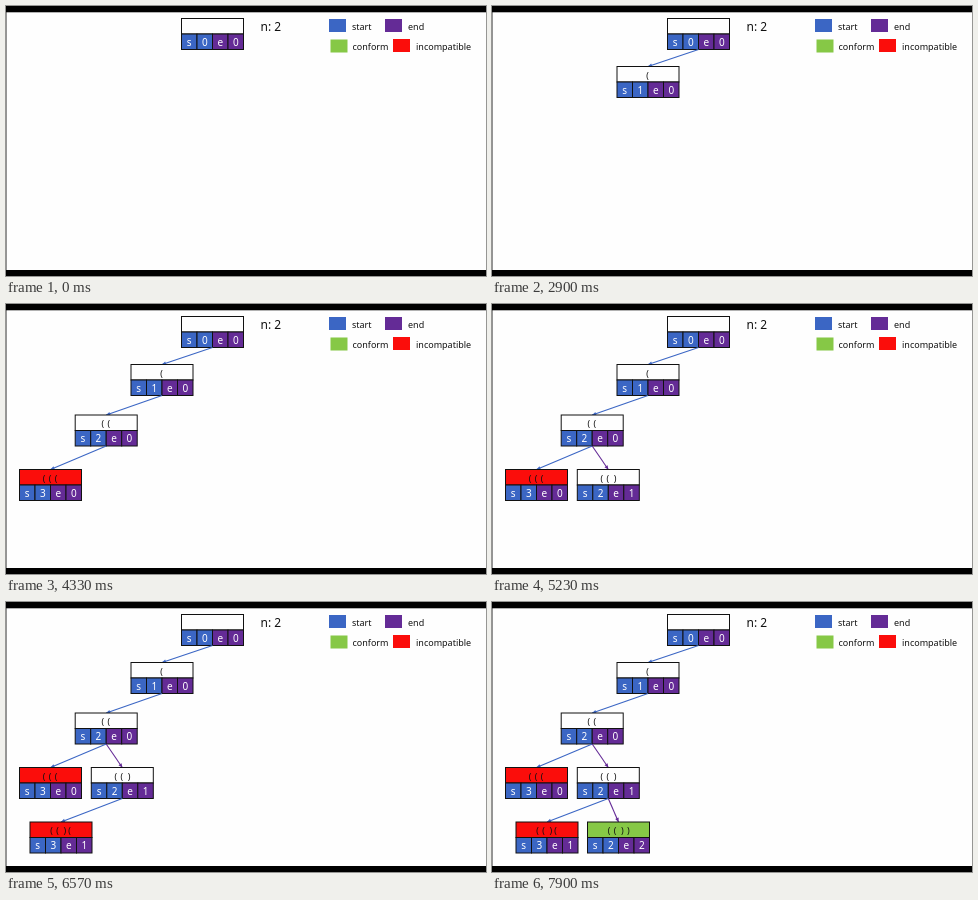
Animation of 480x270 px, one loop 8 s. Source, as an HTML page:

```html
<!DOCTYPE html>
<html lang="en">
<head>
<meta charset="utf-8">
<title>Parentheses tree</title>
<style>
  html, body { margin: 0; width: 100%; height: 100%; overflow: hidden; background: #fefefe; }
  svg { display: block; width: 100%; height: 100%; }
  text { font-family: "Noto Sans", "Open Sans", sans-serif; font-size: 9px; fill: #111; }
  .n { font-size: 12px; }
  .cell { font-size: 10px; fill: #fff; text-anchor: middle; }
  .paren { font-family: "Noto Sans Mono", monospace; text-anchor: middle; }
  .box { stroke: #111; stroke-width: 1; }
</style>
</head>
<body>
<svg id="stage" viewBox="0 0 480 270"></svg>
<script>
const LOOP = 8000;
const BLUE = '#3b66c4', PURPLE = '#642b96', GREEN = '#86c846', RED = '#fb0d0b', WHITE = '#fefefe';
const stage = document.getElementById('stage');

function add(parent, tag, attrs = {}, text = '') {
  const el = document.createElementNS('http://www.w3.org/2000/svg', tag);
  for (const key in attrs) el.setAttribute(key, attrs[key]);
  el.textContent = text;
  return parent.appendChild(el);
}

function rect(parent, x, y, width, height, fill, cls = '') {
  return add(parent, 'rect', { x, y, width, height, fill, class: cls });
}

function legend(x, y, color, label, textX, baseline) {
  rect(stage, x, y, 17, 13, color);
  add(stage, 'text', { x: textX, y: baseline }, label);
}

function arrow(parent, x1, y1, x2, y2, color) {
  add(parent, 'line', { x1, y1, x2, y2, stroke: color, 'stroke-width': 1.1 });
  const angle = Math.atan2(y2 - y1, x2 - x1) * 180 / Math.PI;
  add(parent, 'path', {
    d: 'M0 0L-4 -1.9V1.9Z', fill: color,
    transform: `translate(${x2} ${y2}) rotate(${angle})`
  });
}

function drawNode({ x, y, word, at = 0, from, fill = WHITE }) {
  const g = add(stage, 'g');
  const mid = x + 31;
  if (from) {
    const color = word.endsWith('(') ? BLUE : PURPLE;
    arrow(g, from.x + 31, from.y + 31, mid, y, color);
  }
  rect(g, x, y, 62, 15.5, fill, 'box');
  [...word].forEach((ch, i) => add(g, 'text', {
    x: mid + (i - (word.length - 1) / 2) * 6 + (ch === ')' ? 1 : -0.5),
    y: y + 12, class: 'paren'
  }, ch));

  const opened = word.split('(').length - 1;
  ['s', opened, 'e', word.length - opened].forEach((label, i) => {
    const left = x + i * 15.5;
    rect(g, left, y + 15.5, 15.5, 15.5, i < 2 ? BLUE : PURPLE, 'box');
    add(g, 'text', { x: left + 7.75, y: y + 27, class: 'cell' }, label);
  });

  if (at) {
    const offset = at / LOOP;
    g.animate([
      { opacity: 0, offset: 0 }, { opacity: 0, offset },
      { opacity: 1, offset }, { opacity: 1, offset: 1 }
    ], { duration: LOOP, iterations: Infinity });
  }
}

rect(stage, 0, 0, 480, 270, WHITE);
rect(stage, 0, 6, 0.7, 258, '#666');
rect(stage, 0, 0, 480, 6.3, '#000');
rect(stage, 0, 264, 480, 6, '#000');

add(stage, 'text', { x: 254.5, y: 25, class: 'n' }, 'n: 2');
legend(323, 13, BLUE, 'start', 346, 24);
legend(379, 13, PURPLE, 'end', 402, 24);
legend(324.5, 33.5, GREEN, 'conform', 346.5, 44);
legend(387, 33, RED, 'incompatible', 410, 44);

const root = { x: 175.5, y: 12.5, word: '' };
const one = { x: 125, y: 60.5, word: '(', at: 2000, from: root };
const two = { x: 69.2, y: 111, word: '((', at: 3000, from: one };
const three = { x: 13.5, y: 165.5, word: '(((', at: 4030, from: two, fill: RED };
const closed = { x: 85.3, y: 165.5, word: '(()', at: 5030, from: two };
const reopened = { x: 24, y: 220, word: '(()(', at: 6070, from: closed, fill: RED };
const done = { x: 95.5, y: 220, word: '(())', at: 7100, from: closed, fill: GREEN };
[root, one, two, three, closed, reopened, done].forEach(drawNode);
</script>
</body>
</html>
```
